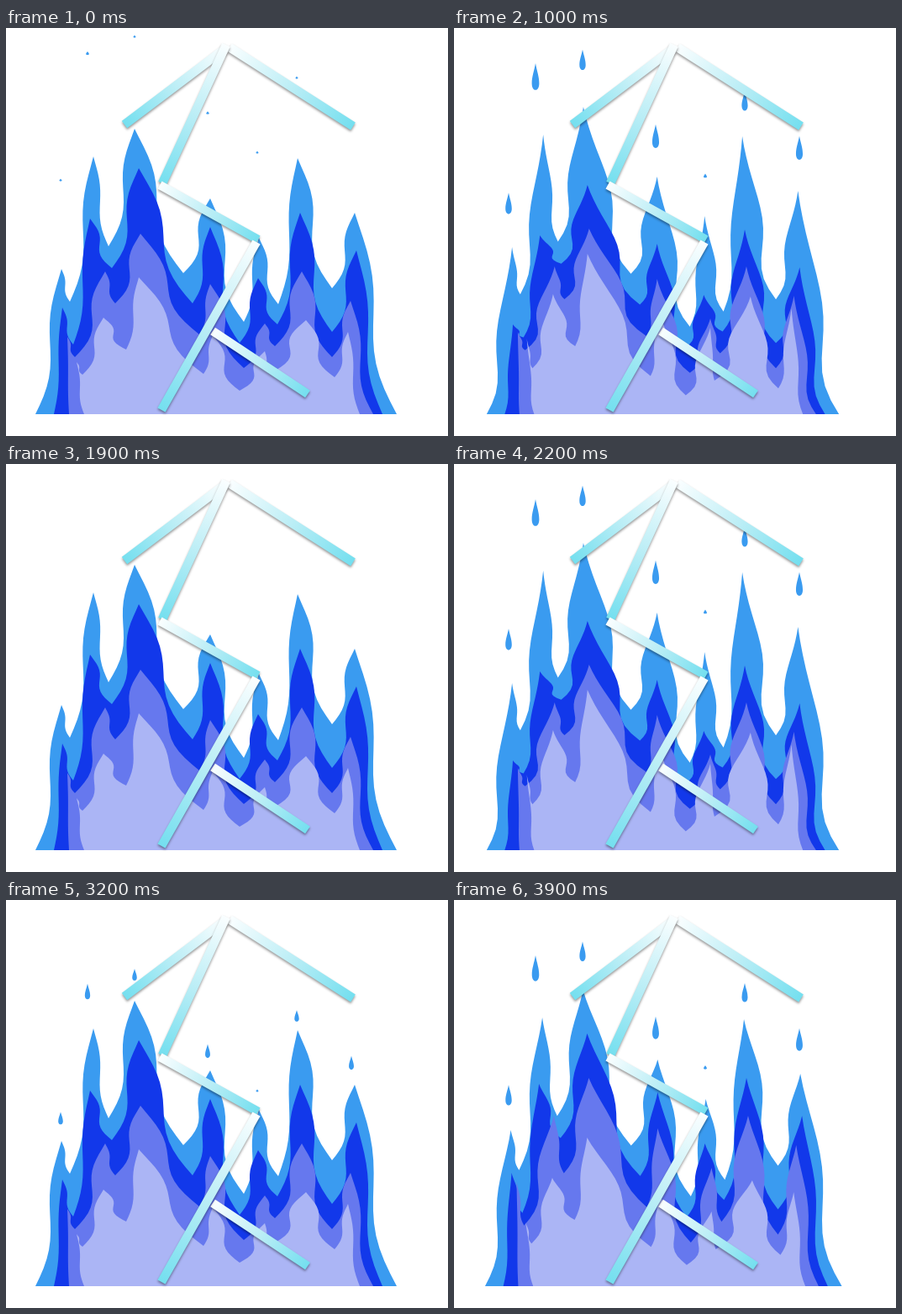
These frames come from a looping animation (526 by 486 pixels, 4 s). An HTML page with a canvas:

```html
<!DOCTYPE html>
<html>
<head>
<meta charset="utf-8">
<style>
html, body { margin: 0; width: 526px; height: 486px; overflow: hidden; background: #fff; }
canvas { display: block; }
</style>
</head>
<body>
<canvas id="stage" width="526" height="486"></canvas>
<script>
const ctx = document.getElementById('stage').getContext('2d');
const BLUE = '#3a9bf0';

// Key points run from the left foot over tips and notches in turn to the right foot.
// lift: how far the tips move at half and at full stretch.
const layers = [
  { color: BLUE, lift: [-13, -26],
    keys: '35,460 66,287 76,326 104,153 122,260 153,120 211,292 243,203 283,350 301,250 324,329 347,155 388,310 415,220 465,460' },
  { color: '#1238ea', lift: [-8, 20],
    keys: '57,460 67,333 80,377 100,227 126,286 158,167 222,328 243,237 278,375 300,298 323,353 350,220 388,362 417,265 448,460' },
  { color: '#6678ee', lift: [-33, -6],
    keys: '75,460 73,368 82,392 118,290 130,328 160,245 230,365 243,305 283,405 308,352 320,379 352,290 388,392 410,325 437,460' },
  { color: '#abb5f5', lift: [-14, -28],
    keys: '93,460 84,398 91,413 116,345 143,383 158,297 235,412 246,366 278,432 308,385 313,412 357,348 391,416 407,362 421,460' }
].map(l => ({ ...l, keys: l.keys.split(' ').map(p => p.split(',').map(Number)) }));

// Starting x, y and full height of each spark
const sparks = [
  [97, 109, 33], [153, 89, 25], [65, 260, 26], [240, 180, 29],
  [299, 227, 5], [346, 138, 24], [411, 194, 29]
];

const sticks = [
  [260, 25, 141, 115], [266, 23, 413, 117], [262, 20, 186, 185],
  [183, 187, 300, 252], [246, 361, 359, 436], [298, 255, 185, 455]
];

// Stretch of the flames in each of the six poses, in halves
const stretch = [0, 0, 0, 1, 2, 1];

// Tips follow the lift, notches tilt to the right, all is drawn together a little.
function movedKeys({ keys, lift }, level) {
  const u = level / 2, tipShift = level ? lift[level - 1] : 0;
  return keys.map(([x, y], i) => {
    const foot = i === 0 || i === keys.length - 1;
    const dy = foot ? 0 : i % 2 ? tipShift : (x - 200) * 0.07 * u;
    return [x + (190 - x) * 0.025 * u, y + dy];
  });
}

// One side of a flame: s is 0 at the tip and 1 at the notch.
// The wave bulges out below the tip and sinks lower as the flame stretches.
function sidePoint(tip, notch, s, u) {
  const dx = notch[0] - tip[0], dy = notch[1] - tip[1];
  const size = Math.sign(dx) * Math.min(9, Math.abs(dx) * 0.2);
  const wave = Math.sin(2 * Math.PI * s ** (1.1 + 0.7 * u)) - 0.5 * Math.sin(Math.PI * s);
  return [tip[0] + dx * s + size * wave, tip[1] + dy * s];
}

function drawLayer(layer, level) {
  const keys = movedKeys(layer, level), steps = 16;
  ctx.fillStyle = layer.color;
  ctx.beginPath();
  for (let i = 1; i < keys.length; i++) {
    const rising = i % 2 === 1;
    const [tip, notch] = rising ? [keys[i], keys[i - 1]] : [keys[i - 1], keys[i]];
    for (let k = 0; k <= steps; k++) {
      const s = k / steps;
      ctx.lineTo(...sidePoint(tip, notch, rising ? 1 - s : s, level / 2));
    }
  }
  ctx.fill();
}

// Sparks leave the tips at the third pose, slow down, swell and shrink away.
function drawSpark([x, y0, size], pose) {
  const age = (pose + 4) % 6;
  if (age === 5) return;
  const y = y0 - 79 * (1 - (1 - age / 4) ** 1.5);
  const h = Math.max(3, size * Math.sin(Math.PI * (age + 1) / 5.2));
  const r = Math.min(h, 3 + h * 0.18) / 2;
  const top = y - h / 2, belly = top + h * 0.75, bottom = top + h * 1.08;
  ctx.fillStyle = BLUE;
  ctx.beginPath();
  ctx.moveTo(x, top);
  ctx.bezierCurveTo(x + r * 0.4, top + h * 0.3, x + r, top + h * 0.5, x + r, belly);
  ctx.bezierCurveTo(x + r, bottom, x - r, bottom, x - r, belly);
  ctx.bezierCurveTo(x - r, top + h * 0.5, x - r * 0.4, top + h * 0.3, x, top);
  ctx.fill();
}

function drawStick([x1, y1, x2, y2]) {
  const shade = ctx.createLinearGradient(x1, y1, x2, y2);
  shade.addColorStop(0, '#fafeff');
  shade.addColorStop(0.5, '#bceef6');
  shade.addColorStop(1, '#74dfef');
  ctx.save();
  ctx.shadowColor = 'rgba(0,0,0,0.4)';
  ctx.shadowBlur = 3;
  ctx.shadowOffsetY = 2;
  ctx.strokeStyle = shade;
  ctx.lineWidth = 10.5;
  ctx.beginPath();
  ctx.moveTo(x1, y1);
  ctx.lineTo(x2, y2);
  ctx.stroke();
  ctx.restore();
}

function draw(now) {
  const pose = Math.floor(now % 4000 / 100) % 6;
  ctx.fillStyle = '#fff';
  ctx.fillRect(0, 0, 526, 486);
  layers.forEach(l => drawLayer(l, stretch[pose]));
  sparks.forEach(s => drawSpark(s, pose));
  sticks.forEach(drawStick);
}

const start = performance.now();
function tick() {
  draw(performance.now() - start);
  requestAnimationFrame(tick);
}
tick();
</script>
</body>
</html>
```
